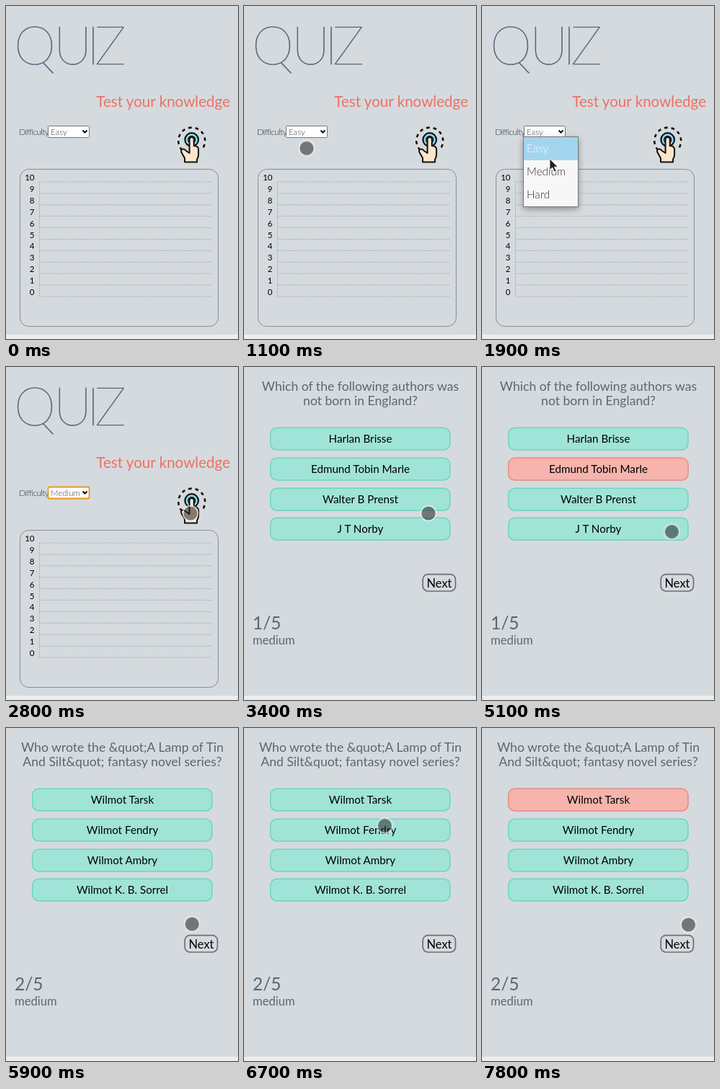
Animation of 322x462 px, one loop 8000 ms. Source, as an HTML page:

```html
<!DOCTYPE html>
<html lang="en">
<head>
<meta charset="utf-8">
<title>Quiz</title>
<style>
html, body { margin: 0; width: 100%; height: 100%; overflow: hidden; background: #d5dade; }
svg { display: block; width: 100%; height: 100%; font-family: Lato, sans-serif; }
.mid { text-anchor: middle; }
.slate { fill: #5c6674; }

/* Every timeline is 8 s long, so 1.25% is 100 ms. */
.t { animation: 8s step-end -10ms infinite; opacity: 0; }
.home { animation-name: home; opacity: 1; }
.easy { animation-name: easy; opacity: 1; }
.medium { animation-name: medium; }
.popup { animation-name: popup; }
.pick-easy { animation-name: pick-easy; }
.pick-medium { animation-name: pick-medium; }
.quiz { animation-name: quiz; }
.first { animation-name: first; }
.second { animation-name: second; }
.wrong-first { animation-name: wrong-first; }
.wrong-second { animation-name: wrong-second; }
.arrow { animation-name: popup, arrow-move; }
.dot { animation-name: dot-show, dot-move; }
.press { animation-name: press; opacity: 1; }

@keyframes home { 0% { opacity: 1 } 37.5% { opacity: .66 } 38.75% { opacity: .33 } 40%, 99.9% { opacity: 0 } }
@keyframes easy { 28.75%, 100% { opacity: 0 } }
@keyframes medium { 28.75%, 100% { opacity: 1 } }
@keyframes popup { 18.75% { opacity: 1 } 28.75%, 100% { opacity: 0 } }
@keyframes pick-easy { 18.75% { opacity: 1 } 25%, 100% { opacity: 0 } }
@keyframes pick-medium { 25% { opacity: 1 } 28.75%, 100% { opacity: 0 } }
@keyframes quiz { 42.5%, 100% { opacity: 1 } }
@keyframes first { 42.5% { opacity: 1 } 71.25%, 100% { opacity: 0 } }
@keyframes second { 71.25%, 100% { opacity: 1 } }
@keyframes wrong-first { 60%, 100% { opacity: 1 } }
@keyframes wrong-second { 91.25%, 100% { opacity: 1 } }
@keyframes press {
  0%, 60%, 71.25%, 91.25%, 100% { transform: scale(1) }
  56.25%, 70%, 88.75% { transform: scale(1.13) }
}
@keyframes arrow-move {
  0% { transform: translate(93px, 187px) }
  20% { transform: translate(93px, 187px); animation-timing-function: steps(3) }
  23.75% { transform: translate(94px, 212px); animation-timing-function: steps(3) }
  27.5%, 100% { transform: translate(98px, 236px) }
}
@keyframes dot-show { 8.75% { opacity: 1 } 18.75% { opacity: 0 } 28.75%, 100% { opacity: 1 } }
@keyframes dot-move {
  0% { transform: translate(103px, 221px) }
  8.75% { transform: translate(103px, 221px); animation-timing-function: steps(2) }
  11.25% { transform: translate(84px, 204px) }
  12.5% { transform: translate(84px, 204px); animation-timing-function: steps(3) }
  16.25% { transform: translate(93px, 184px) }
  28.75% { transform: translate(112px, 229px); animation-timing-function: steps(2) }
  31.25% { transform: translate(184px, 207px); animation-timing-function: steps(3) }
  35% { transform: translate(256px, 203px) }
  47.5% { transform: translate(268px, 188px) }
  48.75% { transform: translate(258px, 171px) }
  51.25% { transform: translate(226.5px, 149px); animation-timing-function: steps(2) }
  53.75% { transform: translate(219px, 139px) }
  60% { transform: translate(219px, 139px); animation-timing-function: steps(3) }
  63.75% { transform: translate(263.5px, 228.5px) }
  65% { transform: translate(263.5px, 228.5px); animation-timing-function: steps(3) }
  68.75% { transform: translate(276px, 301px) }
  72.5% { transform: translate(276px, 301px); animation-timing-function: steps(4) }
  77.5% { transform: translate(205px, 185px) }
  78.75% { transform: translate(205px, 185px); animation-timing-function: steps(4) }
  83.75% { transform: translate(195.5px, 135.5px) }
  85% { transform: translate(195.5px, 135.5px); animation-timing-function: steps(2) }
  87.5% { transform: translate(186px, 105px) }
  91.25% { transform: translate(186px, 105px); animation-timing-function: steps(5) }
  97.5%, 100% { transform: translate(286.5px, 273px) }
}
.popup-box { filter: drop-shadow(0 3px 4px rgba(0, 0, 0, .35)); }
</style>
</head>
<body>
<svg viewBox="0 0 322 462">
  <rect width="322" height="462" fill="#d5dade"/>
  <rect y="456" width="322" height="6" fill="#eceeee"/>

  <g class="t home">
    <text x="11 66 112 123" y="81" font-size="74" font-weight="100" fill="#536479" stroke="#536479" stroke-width=".6">QUIZ</text>
    <text x="311" y="140" text-anchor="end" font-size="20.6" fill="#ee7064">Test your knowledge</text>

    <text x="18" y="179" font-size="12.4" font-weight="300" letter-spacing="-.8" fill="#333a42">Difficulty</text>
    <rect x="58.5" y="166.5" width="57" height="16" rx="1" fill="#fff" stroke="#767676"/>
    <path d="M106.5 172.5l3 3 3-3" fill="none" stroke="#111" stroke-width="2"/>
    <g font-size="11.5" font-weight="300" fill="#444">
      <text class="t easy" x="62" y="179">Easy</text>
      <g class="t medium">
        <rect x="58.5" y="166.5" width="57" height="16" rx="2" fill="none" stroke="#e8981c" stroke-width="1.8"/>
        <text x="62" y="179">Medium</text>
      </g>
    </g>

    <g stroke="#111" stroke-width="2" stroke-linejoin="round" stroke-linecap="round">
      <path d="M244.5 200A18.5 18.5 0 1 1 271 200" fill="none" stroke-width="2.6" stroke-dasharray="4.6 5" stroke-linecap="butt"/>
      <circle cx="257.7" cy="185.5" r="9.3" fill="#8bdcf3" stroke-width="2.2"/>
      <circle cx="257.7" cy="185.5" r="5" fill="#8bdcf3" stroke-width="1.4"/>
      <path d="M254.6 204V185a3.1 3.1 0 0 1 6.2 0V194q6 .4 6.3 4.5V206q0 4-2 6.5V216.5H248V211L243.5 203q-1.500-4 2-4.600 2.400-.2 4.500 2.600Z" fill="#fce5cb"/>
    </g>

    <rect x="19.5" y="226.5" width="275" height="218" rx="12" fill="none" stroke="#868c93"/>
    <g id="chart" font-size="11.5" text-anchor="end" stroke-dasharray="2 1"></g>

    <g class="t popup">
      <rect class="popup-box" x="57.5" y="181.5" width="76" height="97" fill="#f7f7f7" stroke="#777"/>
      <g font-size="15.3" font-weight="300" fill="#333">
        <text x="62" y="235">Medium</text>
        <text x="62" y="267">Hard</text>
        <text x="62" y="203">Easy</text>
        <g class="t pick-easy" fill="#f4faff">
          <rect x="58" y="182" width="75" height="32" fill="#a3d5ef"/>
          <text x="62" y="203">Easy</text>
        </g>
        <g class="t pick-medium" fill="#f4faff">
          <rect x="58" y="214" width="75" height="32" fill="#a3d5ef"/>
          <text x="62" y="235">Medium</text>
        </g>
      </g>
    </g>
  </g>

  <g class="t quiz">
    <rect x="248.2" y="287.7" width="45.3" height="23.3" rx="7" fill="none" stroke="#6d6f7a" stroke-width="1.7"/>
    <text class="mid" x="271" y="306" font-size="16.5">Next</text>
    <text class="slate" x="12" y="385" font-size="16.6">medium</text>
  </g>
  <g class="t first" id="first"></g>
  <g class="t second" id="second"></g>

  <g class="t dot">
    <g class="t press">
      <circle r="10.4" fill="rgba(35,35,35,.55)" stroke="rgba(255,255,255,.72)" stroke-width="1.6"/>
    </g>
  </g>
  <path class="t arrow" d="M0 0V15.5L3.7 12.2 6.3 18 8.9 16.9 6.4 11.2H11.2Z" fill="#222" stroke="#fff" stroke-width=".8"/>
</svg>

<script>
const rowGap = 15.9;
const rows = Array.from({ length: 11 }, (_, i) => {
  const y = 244 + i * rowGap;
  return `<text x="39.5" y="${y - 2}">${10 - i}</text><path d="M46 ${y}H285" stroke="#adb3b9"/>`;
});
document.getElementById('chart').innerHTML =
  rows.join('') + '<path d="M46.5 244V403" stroke="#adb3b9"/>';

function answer(label, row, wrong) {
  const y = Math.floor(84.5 + row * 41.8) + .2;
  const box = (colors, cls = '') =>
    `<rect ${cls} x="36.7" y="${y}" width="249.3" height="30.8" rx="9" stroke-width="1.5" ${colors}/>`;
  return box('fill="#a0e4d7" stroke="#6bd6bf"') +
    (wrong ? box('fill="#f6b4ad" stroke="#f08b82"', `class="t ${wrong}"`) : '') +
    `<text class="mid" x="161.5" y="${y + 21}" font-size="15.2">${label}</text>`;
}

function question(id, number, lines, answers, wrongRow) {
  document.getElementById(id).innerHTML =
    lines.map((line, i) =>
      `<text class="mid slate" x="161.5" y="${33 + i * 20}" font-size="17.6">${line}</text>`).join('') +
    answers.map((label, i) => answer(label, i, i === wrongRow && 'wrong-' + id)).join('') +
    `<text class="slate" x="12" y="364" font-size="24.5">${number}/5</text>`;
}

question('first', 1,
  ['Which of the following authors was', 'not born in England?'],
  ['Harlan Brisse', 'Edmund Tobin Marle', 'Walter B Prenst', 'J T Norby'], 1);
question('second', 2,
  ['Who wrote the &amp;quot;A Lamp of Tin', 'And Silt&amp;quot; fantasy novel series?'],
  ['Wilmot Tarsk', 'Wilmot Fendry', 'Wilmot Ambry', 'Wilmot K. B. Sorrel'], 0);
</script>
</body>
</html>
```
